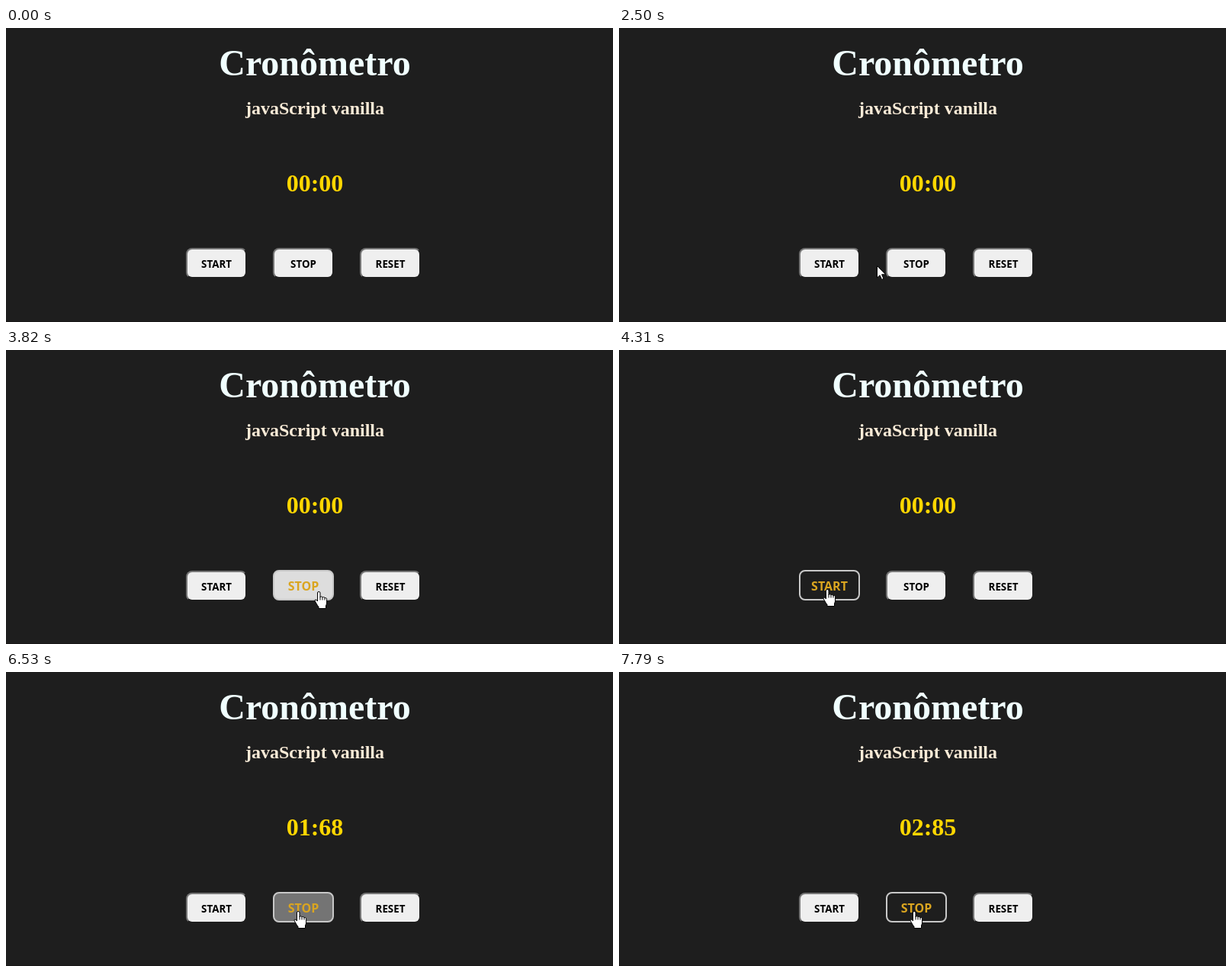
An HTML page with a canvas that plays this animation: 796 px wide and 385 px high, repeating every 8000 ms.

```html
<!DOCTYPE html>
<html lang="pt">
<head>
<meta charset="utf-8">
<title>Cronômetro</title>
<style>
  html, body { margin: 0; width: 100%; height: 100%; overflow: hidden; background: #1e1e1e; }
  canvas { display: block; }
</style>
</head>
<body>
<canvas id="stage" width="796" height="385"></canvas>
<script>
const ctx = document.getElementById('stage').getContext('2d');
const LOOP = 8000, STEP = 70, FADE = 300;
const SERIF = '"Liberation Serif", "Times New Roman", serif';
const SANS = '"Noto Sans", "Open Sans", sans-serif';

const BUTTONS = [
  { label: 'START', x: 236 },
  { label: 'STOP', x: 350 },
  { label: 'RESET', x: 464 }
];

// Bursts of movement, sampled every STEP ms: [start, end]
const BURSTS = [[0, 0], [590, 870], [1130, 1830], [2290, 3480], [3680, 4310], [4710, 7790]];

// Pointer track: [time, x, y]
const TRACK = [
  [590, 564, 378], [870, 452, 364],
  [1130, 452, 364], [1300, 390, 345], [1480, 300, 326], [1620, 281, 316], [1830, 277, 315],
  [2290, 277, 315], [2420, 316, 312], [2500, 338, 311], [2560, 352, 311], [2750, 388, 313],
  [3060, 398, 315], [3130, 428, 318], [3200, 477, 321], [3340, 495, 319], [3480, 500, 317],
  [3680, 500, 317], [3780, 440, 316], [3860, 380, 316], [3980, 316, 315], [4100, 282, 314], [4240, 273, 313],
  [6110, 273, 313], [6290, 314, 312], [6430, 350, 312], [6530, 383, 313], [6740, 387, 313]
];

// Counter in hundredths: [time, value]
const COUNT = [[4760, 0], [5620, 81], [6530, 168], [7790, 285]];

const ARROW = new Path2D('M.5 .5V16L4.1 12.8L6.6 18.4L9 17.4L6.6 11.8H11.6Z');
const HAND = new Path2D('M-1.5 13V2Q-1.5 .5 .2 .5Q2 .5 2 2V8Q2 6.8 3.4 6.8Q5 6.8 5 8.2' +
  'Q5.2 7.4 6.6 7.5Q8 7.6 8 9Q8.4 8.4 9.4 8.5Q10.6 8.7 10.6 10.4V15Q10.6 17 9.5 18.8V22.5H0V20.5' +
  'Q-1.6 18.5 -3 16L-4.8 12.8Q-5.3 11.6 -4.2 11Q-3 10.6 -1.5 13Z');
const KNUCKLES = new Path2D('M2 8V11.5M5 8.2V11.5M8 9V11.5');

// Linear interpolation over keys; returns every value after the time
function sample(keys, t) {
  if (t <= keys[0][0]) return keys[0].slice(1);
  for (let i = 1; i < keys.length; i++) {
    const a = keys[i - 1], b = keys[i];
    if (t <= b[0]) {
      const p = (t - a[0]) / (b[0] - a[0]);
      return a.slice(1).map((v, k) => v + (b[k + 1] - v) * p);
    }
  }
  return keys[keys.length - 1].slice(1);
}

function snap(t) {
  const [start, end] = BURSTS.filter(b => b[0] <= t).pop();
  return Math.min(end, start + Math.floor((t - start) / STEP) * STEP);
}

function hoverAt(t) {
  if (t < TRACK[0][0]) return -1;
  const [x, y] = sample(TRACK, t);
  return BUTTONS.findIndex(b => x >= b.x && x < b.x + 80 && y >= 288 && y < 328);
}

// Time the pointer has been over button i, up to FADE
function hoverTime(t, i) {
  let d = 0;
  while (d < FADE && hoverAt(t - d) === i) d += 2;
  return d;
}

// The CSS "ease" curve: cubic-bezier(.25, .1, .25, 1)
function ease(p) {
  let lo = 0, hi = 1, s = 0;
  const bez = (a, b) => 3 * a * s * (1 - s) ** 2 + 3 * b * s * s * (1 - s) + s ** 3;
  for (let k = 0; k < 20; k++) {
    s = (lo + hi) / 2;
    if (bez(.25, .25) < p) lo = s; else hi = s;
  }
  return bez(.1, 1);
}

function text(str, x, y, font, color) {
  ctx.font = font;
  ctx.fillStyle = color;
  ctx.fillText(str, x, y);
}

function box(x, y, w, h, r) {
  ctx.beginPath();
  ctx.roundRect(x, y, w, h, r);
}

function drawButton({ label, x }, y) {
  ctx.save();
  ctx.beginPath();
  for (const [dx, dy] of [[0, 0], [80, 0], [60, 20], [20, 20], [0, 40]]) ctx.lineTo(x + dx, y + dy);
  ctx.clip();
  box(x, y, 80, 40, 8);
  ctx.fillStyle = '#767676';
  ctx.fill();
  ctx.restore();
  box(x + 2, y + 2, 76, 36, 6);
  ctx.fillStyle = '#efefef';
  ctx.fill();
  text(label, x + 40, y + 26, 'bold 13.333px ' + SANS, '#000');
}

function drawHovered({ label, x }, alpha) {
  box(x + 1, 289, 78, 38, 7);
  ctx.fillStyle = `rgba(239,239,239,${alpha})`;
  ctx.fill();
  ctx.strokeStyle = '#c8c8c8';
  ctx.lineWidth = 2;
  ctx.stroke();
  text(label, x + 40, 315, 'bold 16px ' + SANS, '#daa520');
}

function drawPointer(t, isHand) {
  const [x, y] = sample(TRACK, t).map(Math.round);
  const shape = isHand ? HAND : ARROW;
  ctx.save();
  ctx.translate(x, y);
  ctx.fillStyle = '#fff';
  ctx.strokeStyle = '#000';
  ctx.lineWidth = 1;
  ctx.lineJoin = 'round';
  ctx.fill(shape);
  ctx.stroke(shape);
  if (isHand) ctx.stroke(KNUCKLES);
  ctx.restore();
}

function render(t) {
  ctx.fillStyle = '#1e1e1e';
  ctx.fillRect(0, 0, 796, 385);
  ctx.fillStyle = '#191717';
  ctx.fillRect(0, 384, 796, 1);
  ctx.textAlign = 'center';

  text('Cronômetro', 405, 62, 'bold 48px ' + SERIF, '#f0ffff');
  text('javaScript vanilla', 405, 113, 'bold 24px ' + SERIF, '#faebd7');

  const n = Math.round(sample(COUNT, t)[0]);
  const pad = v => String(v).padStart(2, '0');
  text(pad(Math.floor(n / 100)) + ':' + pad(n % 100), 405, 214, 'bold 32px ' + SERIF, '#ffd700');

  const hover = hoverAt(t);
  BUTTONS.forEach((b, i) => {
    if (i === hover) drawHovered(b, 1 - ease(hoverTime(t, i) / FADE));
    else drawButton(b, hover < 0 ? 288 : 289);
  });
  if (t >= TRACK[0][0]) drawPointer(t, hover >= 0);
}

const begin = performance.now();
function tick() {
  render(snap((performance.now() - begin) % LOOP));
  requestAnimationFrame(tick);
}
tick();
</script>
</body>
</html>
```
